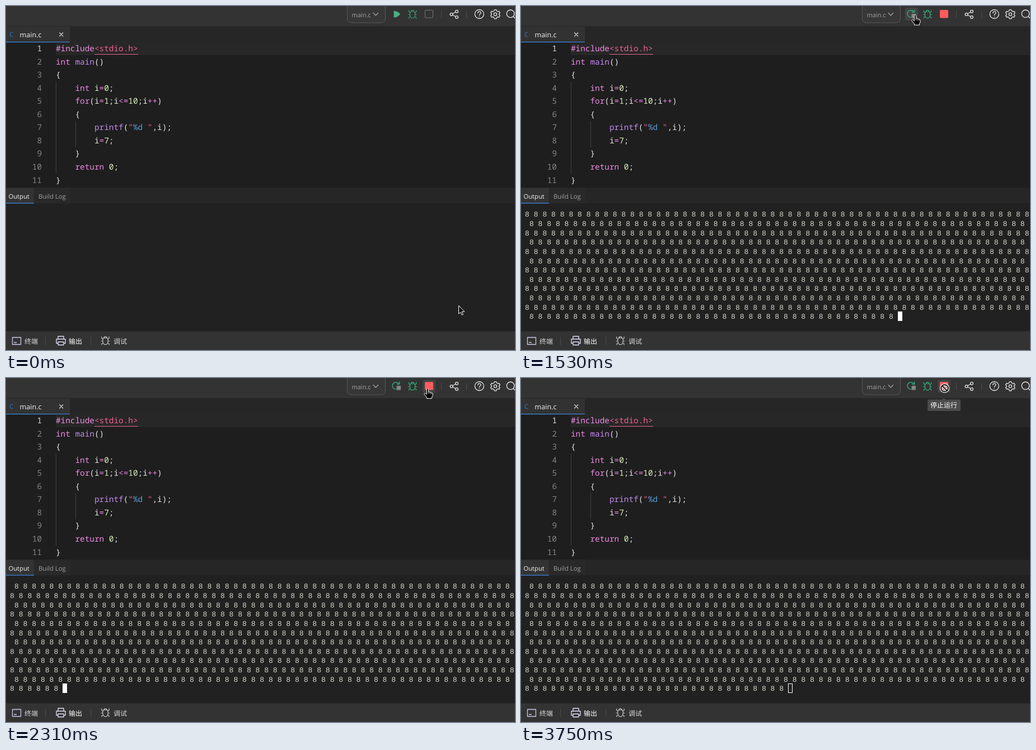
These frames come from a looping animation (909 px wide and 616 px high, 3.85 s). An HTML page:

```html
<!DOCTYPE html>
<html lang="zh">
<head>
<meta charset="utf-8">
<style>
html, body { margin: 0; width: 100%; height: 100%; overflow: hidden; background: #1e1e1e; }
svg { display: block; width: 909px; height: 616px; }
text { white-space: pre; text-rendering: geometricPrecision; font-family: "Open Sans", "Noto Sans", sans-serif; }
.code text { font: 500 14.36px "Noto Sans Mono", monospace; }
.term text { font: 13.06px "Liberation Mono", monospace; fill: #d6d6cc; }
.zh { font: 12px "Noto Sans CJK SC", "Noto Sans CJK", sans-serif; fill: #d8d8d8; }
.line { fill: none; stroke-width: 1.3; stroke-linecap: round; stroke-linejoin: round; }
</style>
</head>
<body>
<svg viewBox="0 0 909 616">
  <defs>
    <g id="bug" class="line" style="stroke-width:1.15">
      <path d="M-3.2 -4.5H3.2C5.6 -1.5 5.4 7.3 0 7.3C-5.4 7.3 -5.6 -1.5 -3.2 -4.5ZM-2.6 -4.7C-2.6 -7.6 2.6 -7.6 2.6 -4.7M-4.4 -2.4L-6.6 -4V-6.8M4.4 -2.4L6.6 -4V-6.8M-4.8 1H-7.4M4.8 1H7.4M-4 4.5L-6.4 5.6V7.6M4 4.5L6.4 5.6V7.6"/>
    </g>
  </defs>

  <rect width="909" height="616" fill="#1e1e1e"/>
  <rect width="909" height="36" fill="#333"/>
  <rect y="36" width="909" height="29" fill="#262626"/>
  <rect y="37" width="114" height="28" fill="#323232"/>
  <rect y="64" width="114" height="1.2" fill="#3b8eea"/>
  <rect x="89" y="65" width="820" height="23" fill="#272727"/>
  <text x="6" y="55" font-size="11.5" fill="#2f78d0">C</text>
  <text x="24.5" y="55.5" font-size="12.6" fill="#f4f4f4">main.c</text>
  <path class="line" d="M95.7 48L101.7 54M101.7 48L95.7 54" stroke="#ddd"/>

  <g class="code" id="code">
    <path d="M89.5 135V300M124.5 206V253" stroke="#404040"/>
    <path d="M158 86.5H236" stroke="#e8608f"/>
  </g>

  <rect y="325.5" width="909" height="28" fill="#262626"/>
  <rect y="325.5" width="50" height="28" fill="#333"/>
  <rect x="50" y="325.5" width="65" height="28" fill="#292929"/>
  <rect y="353.5" width="909" height="230" fill="#212121"/>
  <rect y="352.5" width="50" height="1.2" fill="#3b8eea"/>
  <text x="4.5" y="344.7" font-size="11.2" fill="#f4f4f4">Output</text>
  <text x="58" y="344.7" font-size="11.3" fill="#a0a0a0">Build Log</text>

  <g class="term" id="term"></g>
  <rect id="caret" width="8" height="17"/>

  <rect y="582.5" width="909" height="34" fill="#333"/>
  <g class="line" stroke="#cfc6ea">
    <path d="M11.5 593.5H26.5V606H11.5ZM14.5 602.5H18.5"/>
    <path stroke="#e4e0fa" d="M93 596V591.5H103V596M93 604H90V596.5H106V604H103M93 601.5H103V607H93Z"/>
    <path stroke="#4a4a4a" stroke-width="1" d="M70.5 593V607M151.5 593V607"/>
  </g>
  <use href="#bug" x="177.5" y="599" stroke="#ccc"/>
  <text class="zh" x="33" y="604.5">终端</text>
  <text class="zh" x="112" y="604.5" style="fill:#fff;font-weight:500">输出</text>
  <text class="zh" x="192" y="604.5">调试</text>

  <rect x="609.5" y="-8" width="68" height="38" rx="7" fill="#373737" stroke="#585858"/>
  <text x="617.5" y="19.5" font-size="11" fill="#a2a2a2">main.c</text>
  <path class="line" d="M656 12.5L660.3 17L664.6 12.5" stroke="#a2a2a2"/>
  <rect id="hover" y="3" width="23" height="23" rx="3" fill="#424242"/>
  <path id="play" d="M692.5 9.5Q692.5 8.5 694 8.8Q700 9.5 704 14.7Q700 19.8 694 20.6Q692.5 20.8 692.5 19.8Z" fill="#4bac84"/>
  <g id="rerun">
    <path class="line" d="M696 20A6.2 6.2 0 1 1 701.5 10.5M702.6 7V11.2H698.6" stroke="#2fb57c" stroke-width="1.6"/>
    <rect x="697.5" y="14" width="7.5" height="7.5" fill="#858585"/>
  </g>
  <use id="debug" href="#bug" x="726" y="14.5"/>
  <rect id="stop" x="748.5" y="7.5" width="14" height="13.5" rx="1"/>
  <path d="M777.5 9V21M822.5 9V21" stroke="#4c4c4c"/>
  <g class="line" stroke="#e6e6e6">
    <circle cx="795.5" cy="15" r="2.4"/><circle cx="805" cy="9.7" r="2.4"/><circle cx="805" cy="20" r="2.4"/>
    <path d="M797.8 13.7L802.7 11M797.8 16.2L802.7 18.8"/>
    <circle cx="845.3" cy="14.5" r="8"/>
    <path d="M842.7 12.6C842.7 9 848 9.2 848 12.3C848 14.4 845.3 14.2 845.3 16.4M845.3 18.8V19"/>
    <path d="M871.6 8.8L872.2 6.6H875.6L876.2 8.8L878.4 10L880.6 9.4L882.2 12.3L880.6 13.8V15.7L882.2 17.2L880.6 20L878.4 19.4L876.2 20.7L875.6 22.8H872.2L871.6 20.7L869.4 19.4L867.2 20L865.5 17.2L867.1 15.7V13.8L865.5 12.3L867.2 9.4L869.4 10Z"/>
    <circle cx="873.9" cy="14.7" r="2.6"/>
    <circle cx="901" cy="13.8" r="6.8"/><path d="M906 18.8L910 23"/>
  </g>

  <g id="tip">
    <path d="M751 39L755 36L759 39Z" fill="#4b4b4b"/>
    <rect x="726" y="38.5" width="59" height="20.5" rx="2" fill="#4b4b4b"/>
    <text class="zh" x="731" y="53" style="fill:#fff;font-weight:500">停止运行</text>
  </g>

  <path id="arrow" d="M.5 .5V15.2L3.8 12.2L6.2 17.3L8.4 16.3L6.1 11.3H10.8Z" fill="#111" stroke="#fff"/>
  <g id="hand" stroke="#fff" fill="none">
    <path fill="#000" d="M-1.6 1.5C-1.6 -.5 1.5 -.5 1.5 1.5V6.6C2 5.6 4.3 5.8 4.4 7.2C5 6.4 6.8 6.8 6.9 8C7.5 7.6 9 7.9 9 9.4V13L7.5 15.6V18H-1.6V16L-6 10.6C-6.8 9 -4.8 7.8 -3.4 9.1L-1.6 10.8Z"/>
    <path stroke-width=".8" d="M1.5 6.6V9.5M4.4 7.3V10M6.9 8V10.5"/>
  </g>
  <g id="denied" transform="translate(756.5 18.3)" fill="none">
    <circle r="6.3" stroke="#fff" stroke-width="4.4"/>
    <path d="M-4.4 -4.4L4.4 4.4" stroke="#fff" stroke-width="4.2"/>
    <circle r="6.3" stroke="#111" stroke-width="2"/>
    <path d="M-4.6 -4.6L4.6 4.6" stroke="#111" stroke-width="2"/>
  </g>
</svg>
<script>
const LOOP = 3850, COLS = 115, ROWS = 12;
const CELL = 7.836, LINE = 16.64, LEFT = 7.1, TOP = 364.3;
const el = id => document.getElementById(id);
const show = (id, on) => el(id).setAttribute('visibility', on ? 'visible' : 'hidden');
const set = (id, attrs) => { for (const k in attrs) el(id).setAttribute(k, attrs[k]); };

function addText(parent, x, y, str, fill) {
  const node = document.createElementNS('http://www.w3.org/2000/svg', 'text');
  node.setAttribute('x', x);
  node.setAttribute('y', y);
  if (fill) node.setAttribute('fill', fill);
  node.textContent = str;
  parent.append(node);
  return node;
}

// Code listing with simple syntax colours
const source = `#include<stdio.h>
int main()
{
    int i=0;
    for(i=1;i<=10;i++)
    {
        printf("%d ",i);
        i=7;
    }
    return 0;
}`;
const rules = [
  [/^(#include|int|for|return)$/, '#f08ae6'],
  [/^(main|printf)$/, '#c58af0'],
  [/^(<stdio\.h>|")$/, '#f0628f'],
  [/^%d$/, '#569cd6'],
  [/^\d+$/, '#dcf0bc'],
  [/^[<=+]+$/, '#f08ae6'],
];
const token = /<stdio\.h>|#?\w+|%d|[<=+]+|[^\s]/g;
source.split('\n').forEach((line, i) => {
  const y = 81.3 + i * 23.52, num = String(i + 1);
  addText(el('code'), 64 - num.length * 8.62, y, num, i ? '#858585' : '#d8d8d8');
  for (const m of line.matchAll(token)) {
    const rule = rules.find(r => r[0].test(m[0]));
    addText(el('code'), 89 + m.index * 8.62, y, m[0], rule ? rule[1] : '#e4e4e4');
  }
});

const rows = Array.from({ length: ROWS }, (_, i) => addText(el('term'), LEFT, TOP + 13 + i * LINE, ''));
const fullRow = odd => (odd ? ' 8' : '8 ').repeat(58).slice(0, COLS);

// Moments at which the screen refreshes
const ticks = [0, 100, 210, 320, 430, 540, 660, 770, 880, 1100, 1200, 1420, 1530, 1650, 1760, 1870,
  1970, 2090, 2190, 2300, 2410, 2530, 2630, 2740, 2840, 2980, 3090, 3200, 3310, 3420, 3520, 3630, 3750];
// [time, value]: characters printed, and the hand's fingertip
const printed = [[1420, 160], [1530, 200], [2090, 420], [2630, 554], [2840, 726], [3420, 800], [3750, 980]];
const handX = [[770, 703], [880, 704], [1870, 704], [1970, 721], [2090, 739], [2190, 750], [2410, 756], [2530, 757]];
const handY = [[1970, 16], [2090, 18], [2410, 19], [2530, 20]];

function track(t, keys) {
  if (t <= keys[0][0]) return keys[0][1];
  for (let i = 1; i < keys.length; i++) {
    const [a, u] = keys[i - 1], [b, v] = keys[i];
    if (t <= b) return u + (v - u) * (t - a) / (b - a);
  }
  return keys[keys.length - 1][1];
}

function drawTerminal(t) {
  const on = t >= 1420;
  const total = on ? 2 * Math.round(track(t, printed) / 2) : 0;
  const line = Math.floor(total / COLS), col = total % COLS;
  rows.forEach((row, i) => {
    const last = i === ROWS - 1;
    row.textContent = on ? fullRow((line - ROWS + 1 + i) & 1).slice(0, last ? col : COLS) : '';
  });
  const hollow = t >= 3630, inset = hollow ? .5 : 0;
  show('caret', t >= 1200);
  set('caret', {
    x: Math.floor(LEFT + col * CELL) + inset,
    y: Math.round(TOP + (on ? ROWS - 1 : 1) * LINE) + inset,
    width: hollow ? 7 : 8, height: hollow ? 16 : 17,
    fill: hollow ? 'none' : '#fff', stroke: hollow ? '#fff' : 'none',
  });
}

function drawToolbar(t) {
  const running = t >= 1100;
  show('play', !running);
  show('rerun', running);
  set('debug', { stroke: running ? '#2fb57c' : '#3f9a74' });
  set('stop', { fill: running ? '#ff5c5c' : 'none', stroke: running ? '#ff5c5c' : '#777' });
  show('hover', t >= 770 && (t < 1970 || t >= 2090));
  set('hover', { x: t < 2000 ? 686 : 744 });
  show('tip', t >= 2740);
}

function drawPointer(t) {
  const p = Math.min(t / 540, 1), s = p * p * (3 - 2 * p);
  const nudge = t >= 660 ? 6 : 0;
  show('arrow', t < 770);
  set('arrow', { transform: `translate(${808 - 93 * s - nudge} ${536 - 509 * s - nudge})` });
  show('hand', t >= 770 && t < 3630);
  set('hand', { transform: `translate(${track(t, handX)} ${track(t, handY)})` });
  show('denied', t >= 3630);
}

function draw(now) {
  const time = now % LOOP;
  const t = ticks.filter(k => k <= time).pop();
  drawTerminal(t);
  drawToolbar(t);
  drawPointer(t);
}

const start = performance.now();
function loop() {
  draw(performance.now() - start);
  requestAnimationFrame(loop);
}
loop();
</script>
</body>
</html>
```
